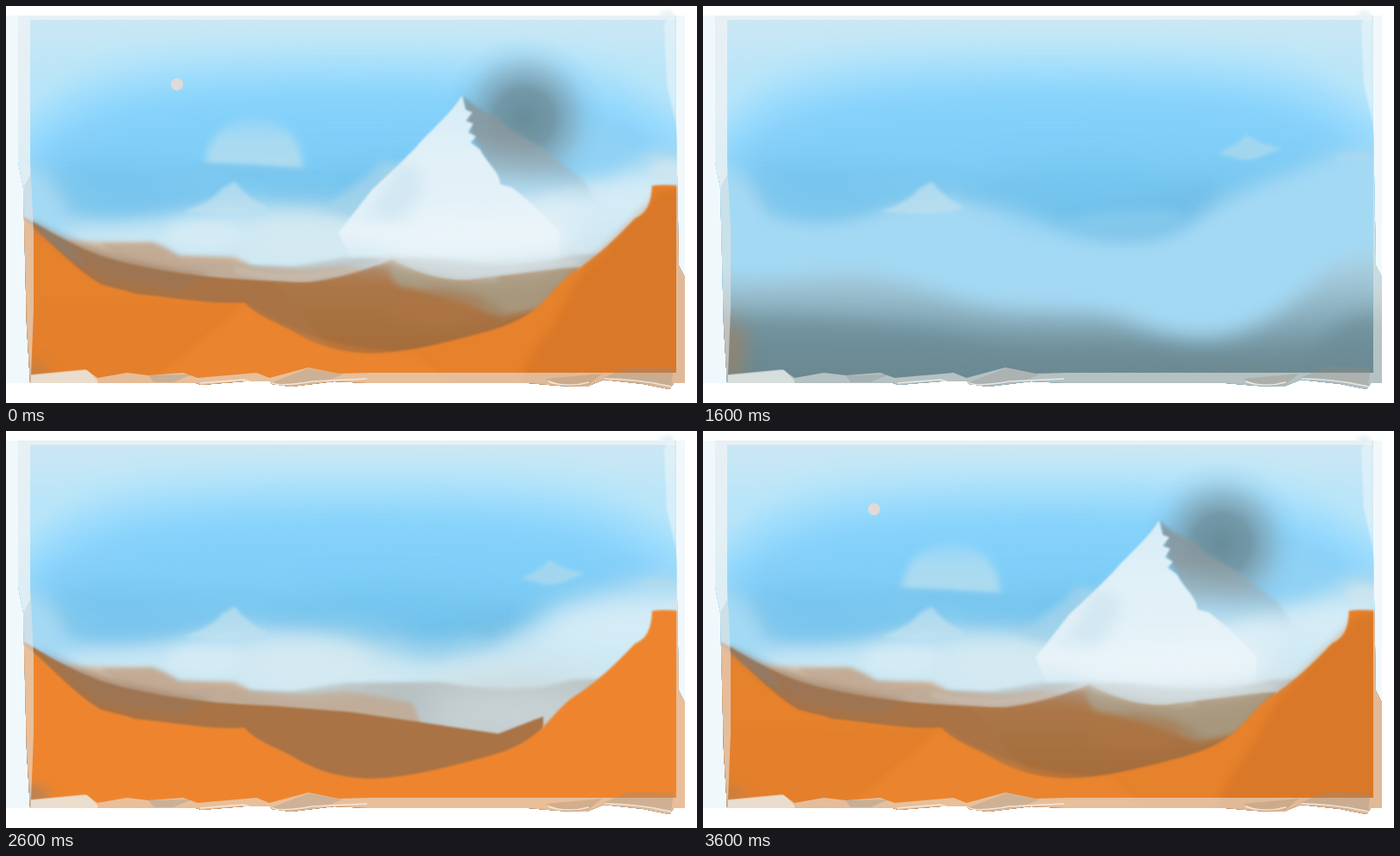
Animation, 800 px wide and 459 px high, one loop 3.8 s. Source, as an HTML page:

```html
<!DOCTYPE html>
<html lang="en">
<head>
<meta charset="utf-8">
<title>Desert painting, step by step</title>
<style>
html, body { margin: 0; width: 100%; height: 100%; overflow: hidden; background: #fff; }
svg { display: block; width: 800px; height: 459px; }
</style>
</head>
<body>
<svg id="stage" viewBox="0 0 800 459" xmlns="http://www.w3.org/2000/svg"></svg>
<script>
const stage = document.getElementById('stage');

const soft = b => b ? ` filter="url(#b${b})"` : '';
const path = (d, fill, blur = 0, op = 1) =>
  `<path d="${d}" fill="${fill}" fill-rule="evenodd" opacity="${op}"${soft(blur)}/>`;
const line = (d, color, w, blur = 0, op = 1) =>
  `<path d="${d}" fill="none" stroke="${color}" stroke-width="${w}" opacity="${op}"${soft(blur)}/>`;
const oval = (x, y, rx, ry, fill, blur = 0, op = 1) =>
  `<ellipse cx="${x}" cy="${y}" rx="${rx}" ry="${ry}" fill="${fill}" opacity="${op}"${soft(blur)}/>`;
const stops = list => list.map(([o, c, a = 1]) =>
  `<stop offset="${o}" stop-color="${c}" stop-opacity="${a}"/>`).join('');
const fade = (id, y1, y2, list) =>
  `<linearGradient id="${id}" gradientUnits="userSpaceOnUse" x1="0" x2="0" y1="${y1}" y2="${y2}">${stops(list)}</linearGradient>`;
const glow = (id, x, y, r, list) =>
  `<radialGradient id="${id}" gradientUnits="userSpaceOnUse" cx="${x}" cy="${y}" r="${r}">${stops(list)}</radialGradient>`;

// A wash whose upper edge is high in the middle (top) and at another height at the sides.
const wash = (top, side, fill, blur, op) =>
  path(`M-40 ${side + 35}L14 ${side}C70 ${top + 4} 170 ${top} 400 ${top}S700 ${top} 788 ${side - 12}L840 ${side}V520H-40Z`, fill, blur, op);

const blurs = [1, 2, 3, 5, 8, 12, 20].map(b =>
  `<filter id="b${b}" filterUnits="userSpaceOnUse" x="-60" y="-60" width="920" height="600"><feGaussianBlur stdDeviation="${b}"/></filter>`).join('');

const inner = 'M28 16H774L776 140 776 424H424L385 425 350 418 305 430 290 424 222 430 205 424 165 427 140 424 106 430 92 420 29 426L32 350 32 260 28 180Z';
const outer = 'M14 11H776V140L779 300 786 314V436H773L768 443 738 437 692 432 672 440 640 439 605 436H420L380 434 330 440 308 437 306 434 275 434 226 438 220 436H28L24 370 20 210 14 180Z';

const defs = blurs +
  `<clipPath id="edge"><path d="${outer}"/></clipPath>` +
  fade('sky', 16, 430, [[0, '#cbe7f3'], [.1, '#c0e6f7'], [.25, '#b0e1f9'], [.5, '#74c2ea'],
    [.7, '#67add6'], [.83, '#659fbe'], [.9, '#6b919e'], [1, '#6c8184']]) +
  fade('low', 300, 430, [[0, '#a9cfe0'], [.45, '#8bafbe'], [.8, '#6d8e99'], [1, '#72868a']]) +
  fade('tan', 268, 425, [[0, '#d3b69b'], [.25, '#c4aa8f'], [.55, '#a78e74'], [.85, '#977757'], [1, '#a0734a']]) +
  fade('mid', 285, 425, [[0, '#b7bebd'], [.4, '#b3babb'], [.75, '#a79f90'], [1, '#a1815f']]) +
  fade('floor', 310, 425, [[0, '#aaa99d'], [.4, '#a1937d'], [.7, '#a08566'], [1, '#9f774f']]) +
  fade('valley', 295, 400, [[0, '#a98b70'], [.25, '#ac7748'], [1, '#a56c3b']]) +
  fade('snow', 103, 294, [[0, '#d6ecf7'], [.4, '#e2f1f8'], [.6, '#e6f2f8', .95], [.84, '#ecf5fa', .8], [1, '#eef6fa', 0]]) +
  fade('face', 103, 235, [[0, '#84959b', .85], [.35, '#8b9a9f', .85], [.65, '#9db4bf', .7], [1, '#bcd9e5', 0]]) +
  fade('sun', 125, 190, [[0, '#97d7fa', .5], [.4, '#a9daf2'], [1, '#b2dcee']]) +
  glow('halo', 600, 130, 96, [[0, '#668790', .92], [.35, '#6d8b96', .82], [.6, '#7d9fae', .52],
    [.8, '#82b6d2', .2], [1, '#80c6ec', 0]]);

const orange = 'M-20 215L32 256C55 276 82 306 110 322C130 328 140 329 150 333C190 336 235 346 276 343C290 360 318 367 340 381C362 393 388 401 420 402C465 401 500 391 540 381C575 372 600 364 622 342C638 325 648 312 664 303C690 285 710 265 728 246C741 240 747 231 748 208Q765 205 800 211V470H-20Z';
const skyline = 'M-20 160L40 188 72 222 C110 254 170 243 205 230L280 212C330 232 360 222 395 242C440 262 475 270 520 264C560 258 575 236 610 218S690 190 720 174L820 145V470H-20Z';
const shore = 'M-20 314L32 316C95 322 135 309 180 310C240 318 290 342 340 350C400 358 450 348 490 364C530 381 560 386 590 384C650 377 690 338 720 310C740 292 760 288 820 284';

// Each layer: first step, last step, drawing.
const layers = [
  [1, 1, '<rect width="800" height="459" fill="#fff"/>' +
    wash(130, 150, '#ebf6fb', 3) +
    wash(172, 192, '#f0e2d8', 8) +
    wash(190, 220, '#dcc4af', 8) +
    wash(208, 246, '#cdb094', 8) +
    wash(228, 268, '#c69d76', 8) +
    wash(248, 296, '#b0936f', 8) +
    wash(270, 318, '#9c815f', 8) +
    wash(290, 345, '#94704d', 8) +
    wash(306, 368, '#776047', 8) +
    oval(36, 385, 16, 34, '#a87f59', 8, .7) + oval(69, 375, 20, 42, '#63706f', 8, .6) +
    oval(766, 378, 15, 44, '#66777a', 8, .7) +
    '<rect x="104" y="320" width="625" height="150" rx="45" fill="#6b5945" filter="url(#b8)"/>'],

  [2, 14, '<rect width="800" height="459" fill="url(#sky)"/>' +
    wash(38, 110, '#bce6f8', 8) +
    wash(56, 135, '#a9e0fb', 12) +
    wash(80, 160, '#98dafd', 12) +
    wash(106, 190, '#89d2fb', 12) +
    wash(145, 225, '#79c8f1', 20) +
    wash(215, 270, '#6cb9e2', 20) +
    wash(285, 310, '#65a9d2', 20) +
    path('M-40 315C150 345 280 357 420 358S690 345 840 315V520H-40Z', '#6a94a3', 12) +
    path('M-40 365C150 395 280 402 420 402S690 390 840 365V520H-40Z', '#6c8386', 8) +
    oval(35, 260, 58, 42, '#9ab0bb', 20, .7) + oval(775, 265, 38, 42, '#9fb1b9', 20, .7) +
    oval(30, 395, 18, 42, '#a5805f', 12, .8)],

  [4, 14, oval(400, 148, 300, 52, '#82d1fb', 20, .7) +
    path(skyline, '#a4d9f4', 12) +
    path('M68 205L72 240C110 253 180 243 205 230L280 212 360 228C300 190 240 185 190 197S110 216 68 190Z', '#7dc8f0', 8, .7) +
    oval(445, 218, 105, 32, '#75c5ef', 20, .85) +
    path('M410 255Q500 274 560 248L545 235 450 240Z', '#8accee', 8, .8) +
    path(shore + 'V480H-20Z', 'url(#low)', 12) +
    path('M-20 362Q80 355 180 364T290 379 380 400Q520 393 600 418T740 363L820 348V480H-20Z', '#6b8b95', 12, .7) +
    oval(32, 397, 17, 38, '#a3815f', 12, .7)],

  [5, 14, oval(375, 284, 112, 48, '#c9e4ee', 20, .95) +
    oval(590, 306, 115, 56, '#c9e4ef', 20, .95) +
    path('M490 282Q570 262 695 267L690 296H480Z', '#c2dae2', 5, .5)],

  [3, 14, path('M265 203C277 218 288 226 303 233C280 243 230 240 204 238C222 233 242 222 250 211Z', '#bcdfee', 2, .8) +
    path('M630 149C642 158 655 161 670 165C650 172 640 179 624 178Q610 174 596 170Q616 163 630 149Z', '#a9d8ed', 2, .85) +
    oval(754, 175, 22, 5, '#b0d9ec', 3, .7)],

  [6, 14, path('M68 260C125 248 215 250 250 240C320 247 390 247 425 270L570 260 640 218 820 182V345H68Z', '#d3eaf3', 12, .8) +
    oval(715, 226, 95, 32, '#d9eef7', 20, .8) +
    oval(230, 266, 45, 17, '#d6ecf5', 8, .9)],

  [7, 14, path('M170 296L332 301 390 291 500 290Q565 302 620 296L655 288 738 284 800 236V470H170Z', 'url(#mid)', 2, .9) +
    path('M168 274Q185 279 200 290L263 297Q340 318 390 348L470 372 520 420H150Z', '#b1aca1', 3, .6) +
    oval(450, 350, 110, 22, '#b3c2c7', 12, .75) +
    oval(590, 330, 110, 40, '#c9d3d5', 20, .9) +
    path('M-20 268L70 272 168 274Q185 279 200 290C222 330 262 358 310 376L430 420V470H-20Z', 'url(#tan)', 3, .85) +
    path('M150 320C220 345 255 364 305 376C380 393 470 392 540 385C630 372 700 336 820 303V470H150Z', 'url(#floor)', 3, .9) +
    oval(590, 388, 65, 20, '#b0aa9c', 12, .55)],

  [8, 14, path('M110 275L168 274 200 290 263 292 282 301 345 304 390 300 470 314 500 385H300L180 320Z', '#c1aa94', 2, .85) +
    line('M203 293L263 293 280 301', '#cda98a', 6, 3, .7) +
    oval(350, 268, 76, 27, '#d7eaf1', 12, .65)],

  [9, 14, path('M-20 220L32 250C55 264 80 278 110 289C170 308 250 316 312 318L400 325 570 350 622 330V450H-20Z', '#a97345', 1) +
    path('M32 250C75 275 145 299 235 312L200 328 110 315Z', '#98775b', 5, .65)],

  [10, 14, path('M310 319Q365 326 447 293C470 306 500 318 535 317C580 312 620 305 664 302L620 360 500 402 380 402Z', 'url(#valley)', 1) +
    path('M447 294C470 307 500 319 535 318L662 302 620 350 575 358C540 350 500 330 460 325Q439 318 447 294Z', '#a79980', 3, .95) +
    line('M490 331Q545 333 578 359', '#9d8160', 9, 5, .65)],

  [9, 14, path(orange, '#ee852f', 1) + oval(30, 421, 20, 10, '#9d8167', 8, .8)],

  [11, 14, line('M264 304Q350 329 447 289Q510 322 660 298', '#dadcdb', 5, 3, .4) +
    oval(500, 352, 55, 19, '#ad7445', 8, .65) +
    oval(765, 190, 22, 12, '#cfe5ef', 5, .8) +
    path('M28 247L75 277 95 304 70 288 32 258Z', '#8d7e70', 3, .8)],

  [12, 14, path('M230 184A57 58 0 0 1 344 189Z', 'url(#sun)', 5, .95) +
    path('M215 182Q290 182 370 191Q330 206 265 200Z', '#7ac6ee', 2, .8) +
    oval(198, 90.5, 7, 7, '#e1dad6') +
    path('M20 340Q150 345 276 345L204 404 120 440H20Z', '#e47f2d', 3, .35)],

  [13, 14, path(orange, '#d57a2c', 1, .3) +
    path('M668 303L748 225Q752 209 800 211V460H585C600 420 612 395 622 385Q640 362 668 303Z', '#c56a20', 5, .38) +
    path('M276 344Q245 370 204 405L160 440H520L470 400Q360 400 276 344Z', '#f08b35', 3, .35)],

  [14, 14, oval(645, 164, 85, 34, '#92d2f4', 12, .9) +
    '<circle cx="600" cy="130" r="96" fill="url(#halo)"/>' +
    path('M528 103Q550 123 568 127C585 151 615 154 637 177L668 200 690 235 637 255 572 206 538 145Z', 'url(#face)', 2) +
    oval(540, 252, 130, 42, '#e3f1f7', 20, .9) +
    path('M453 184L434 178 421 194 368 234 422 251 470 200Z', '#a5d3ea', 5, .75) +
    path('M528 103C517 123 490 145 474 164L452 186 424 212 385 262 400 294H640L641 262C625 242 603 223 586 210L572 206C573 193 555 180 549 166L538 158 544 151 535 146 541 136 532 133 540 123 532 120Z', 'url(#snow)', 1) +
    path('M470 183Q491 201 472 228T450 250L420 240 440 210 452 186Z', '#c8e2ee', 8, .6) +
    oval(540, 274, 112, 20, '#eaf4f9', 12, .85) +
    line('M430 297L447 292Q505 323 570 314', '#d8dcda', 4, 3, .5)]
];

stage.innerHTML = `<defs>${defs}</defs><rect width="800" height="459" fill="#fff"/>` +
  '<path id="side" fill="#f0f8fc"/>' +
  '<g clip-path="url(#edge)">' + layers.map(l => `<g class="layer">${l[2]}</g>`).join('') +
  path('M-10 -10H810V470H-10Z' + inner, '#e7e6e3', 0, .6) +
  path('M14 11H28V195L20 210 14 180ZM28 11H774V16H28Z', '#f3fafd', 0, .55) +
  path('M29 427L94 421 106 433V437H29Z', '#eff3f1', 0, .6) +
  path('M165 427L215 426 194 435H171Z', '#7f8d8e', 0, .3) +
  path('M308 435L350 419 390 426 370 434 325 440Z', '#918f87', 0, .3) +
  path('M625 431L690 425 674 438 645 440Z', '#91775f', 0, .25) +
  path('M692 430L720 417 773 418 770 440 738 436Z', '#948b80', 0, .3) +
  '</g><g id="rim">' +
  path('M762 20L774 8 776 138 765 90Z', '#f3f9fc', 1, .5) +
  path('M754 9L768 4 776 13 765 16Z', '#e5f1f6', 2, .9) + '</g>' +
  line('M225 436L275 432 285 435M307 435Q315 441 355 434L418 431M628 434Q650 442 675 435M693 431Q730 431 770 440', '#f5f3ef', 1.5, 0, .8);

const groups = [...stage.querySelectorAll('.layer')];
const side = document.getElementById('side');
const rim = document.getElementById('rim');
const HOLD = 1000, STEP = 200, LOOP = 3800;
let shown = -1;

function draw(now) {
  const t = now % LOOP;
  const step = t < HOLD ? 14 : 1 + Math.floor((t - HOLD) / STEP);
  if (step === shown) return;
  shown = step;
  layers.forEach(([from, to], i) => {
    groups[i].style.display = step >= from && step <= to ? '' : 'none';
  });
  side.setAttribute('d', step === 1 ? 'M0 219L14 205V170L28 140V436H0ZM776 150L786 160V436H776Z'
    : 'M0 11H28V436H0ZM774 11H786V436H774Z');
  rim.style.display = step === 1 ? 'none' : '';
}

const start = performance.now();
function tick() {
  draw(performance.now() - start);
  requestAnimationFrame(tick);
}
draw(0);
requestAnimationFrame(tick);
</script>
</body>
</html>
```
